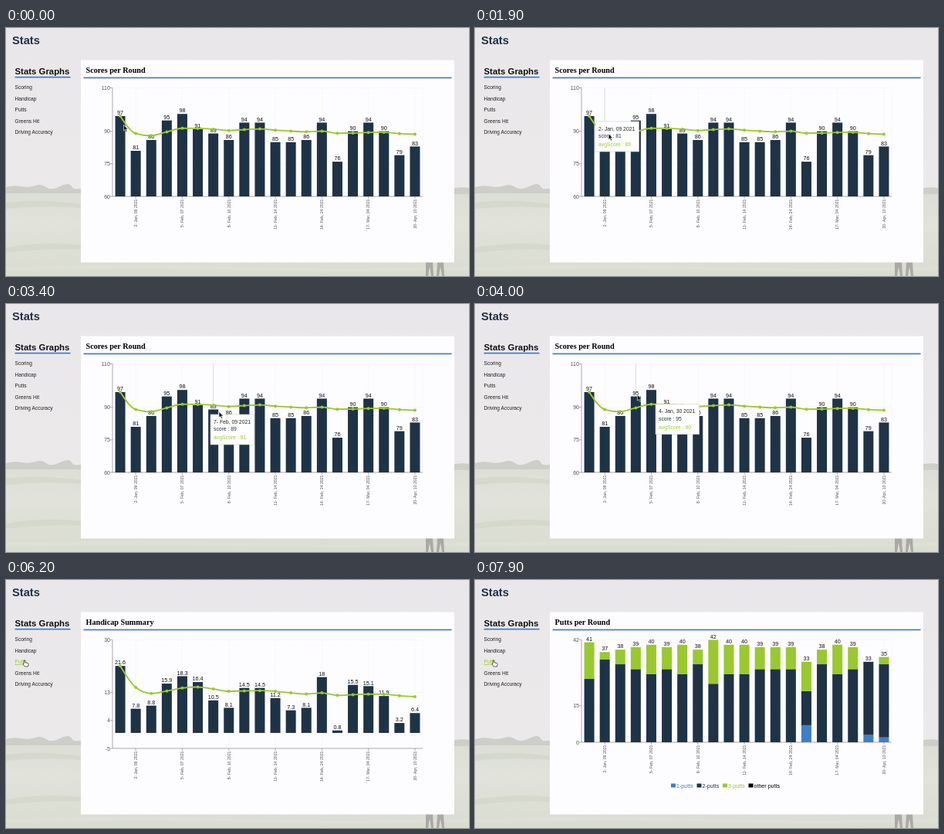
Write an HTML page that moves like this. It is 600 by 321 pixels and loops after 8000 ms.

```html
<!DOCTYPE html>
<html lang="en">
<head>
<meta charset="utf-8">
<title>Stats</title>
<style>
html, body { margin: 0; height: 100%; overflow: hidden; background: #e9e7e9; }
svg { display: block; width: 100vw; height: 100vh; font-family: "Liberation Sans", Arial, sans-serif; }
.green { fill: #9ac830; }
.navy { fill: #1f3347; }
.blue { fill: #3f7fc6; }
.axis { stroke: #777; stroke-width: .6; }
.grid { stroke: #ededf0; stroke-width: .6; stroke-dasharray: 2 1.5; }
.tick { font-size: 6.9px; fill: #555; text-anchor: end; }
.date { font-size: 5.2px; fill: #555; text-anchor: end; }
.value { font-size: 7.2px; fill: #111; text-anchor: middle; }
.menu { font-size: 6.6px; fill: #222; }
.menu.on { fill: #9ac830; text-decoration: underline; }
.legend { font-size: 7.1px; }
.tip { font-size: 6.8px; }
</style>
</head>
<body>
<svg id="stage" viewBox="0 0 600 321" preserveAspectRatio="none">
  <defs>
    <linearGradient id="sky" x2="0" y2="1"><stop stop-color="#e9e7e9"/><stop offset="1" stop-color="#ebe9ea"/></linearGradient>
    <linearGradient id="grass" x2="0" y2="1"><stop stop-color="#dcddd5"/><stop offset=".4" stop-color="#e1e2da"/><stop offset="1" stop-color="#d9dccf"/></linearGradient>
  </defs>
  <rect width="600" height="210" fill="url(#sky)"/>
  <rect y="209" width="600" height="112" fill="url(#grass)"/>
  <path d="M0 206q10-3 20-1t18-1 14 2 18-1 15 0 15 2v7H0zM578 208q10-3 22-1v8h-22z" fill="#cccec7"/>
  <path d="M0 226q40-6 100 2v5q-50-4-100 1zM0 284q50-8 100-3v6q-50-2-100 4z" fill="#d5d9cb"/>
  <path d="M0 309q150-5 300 0t300-1v5q-150 3-300 0t-300 1z" fill="#dee0d5"/>
  <path d="M544 303h9l1 18h-3l-2-12-2 12h-3zM559 303h8l1 18h-3l-2-12-2 12h-3z" fill="#aaa9a4"/>
  <rect x="97" y="41.5" width="484" height="262" fill="#fdfcfe"/>
  <text x="8" y="21.3" font-size="14.7" font-weight="bold" class="navy">Stats</text>
  <text x="11.5" y="60.3" font-size="11.4" font-weight="bold" fill="#111">Stats Graphs</text>
  <rect x="11.5" y="62.8" width="72" height="1.7" class="blue"/>
  <text id="title" x="103.5" y="58" font-size="10.2" font-weight="bold" font-family="'Liberation Serif', 'Times New Roman', serif"></text>
  <rect x="100.5" y="63.6" width="477" height="1.7" class="blue"/>
  <g id="menu"></g>
  <line id="guide" y1="77.5" y2="218" stroke="#ccc" stroke-width=".7"/>
  <g id="charts"></g>
  <g id="tip" class="tip">
    <rect width="56.5" height="39" fill="#fff" stroke="#ccc" stroke-width=".6"/>
    <text x="4" y="11.5" fill="#222"></text>
    <text x="4" y="20.8" class="navy"></text>
    <text x="4" y="31.8" class="green"></text>
  </g>
  <path id="arrow" d="M0 0v7.5l1.8-1.6 1.3 3 1.4-.6-1.3-2.9h2.4z" fill="#111" stroke="#fff" stroke-width=".6"/>
  <path id="hand" d="M-.8 0q.8-.8 1.6 0v2.8l3.6.9q.8.3.7 1.2l-.6 3.1h-4.2l-2.4-3.2q0-1 1.3-.4z" fill="#fff" stroke="#222" stroke-width=".7"/>
</svg>
<script>
const $ = id => document.getElementById(id);
const LOOP = 8000, LEFT = 138, RIGHT = 540, TOP = 77.5, STEP = 20.1, BAR = 13;
const scores = [97, 81, 86, 95, 98, 91, 89, 86, 94, 94, 85, 85, 86, 94, 76, 90, 94, 90, 79, 83];
const handicaps = [21.6, 7.8, 8.8, 15.9, 18.3, 16.4, 10.5, 8.1, 14.5, 14.5, 11.2, 7.3, 8.1, 18, .8, 15.5, 15.1, 11.9, 3.2, 6.4];
const putts = [41, 37, 38, 39, 40, 39, 40, 38, 42, 40, 40, 39, 39, 39, 33, 38, 40, 39, 33, 35];
const dates = ["Jan, 02", "Jan, 09", "Jan, 16", "Jan, 30", "Feb, 07", "Feb, 08", "Feb, 09", "Feb, 10", "Feb, 11", "Feb, 13",
  "Feb, 14", "Feb, 16", "Feb, 20", "Feb, 24", "Feb, 27", "Mar, 02", "Mar, 04", "Mar, 20", "Apr, 03", "Apr, 10"]
  .map((d, i) => `${i + 1}- ${d} 2021`);

function add(parent, tag, attrs, text = "") {
  const el = document.createElementNS("http://www.w3.org/2000/svg", tag);
  for (const k in attrs) el.setAttribute(k, attrs[k]);
  el.textContent = text;
  return parent.appendChild(el);
}
const show = (el, on) => el.style.display = on ? "" : "none";
const place = (el, [x, y]) => el.setAttribute("transform", `translate(${x} ${y})`);
const center = i => LEFT + STEP * (i + .5);
const averages = list => {
  let sum = 0;
  return list.map((v, i) => (sum += v) / (i + 1));
};

// Monotone cubic through evenly spaced points
function monotone(ys) {
  const slope = ys.slice(1).map((y, i) => (y - ys[i]) / STEP);
  const m = ys.map((_, i) => {
    const a = slope[i - 1], b = slope[i];
    return a === undefined || b === undefined ? null
      : (Math.sign(a) + Math.sign(b)) * Math.min(Math.abs(a), Math.abs(b), Math.abs(a + b) / 4);
  });
  const end = ys.length - 1, h = STEP / 3;
  m[0] = (3 * slope[0] - m[1]) / 2;
  m[end] = (3 * slope[end - 1] - m[end - 1]) / 2;
  return ys.reduce((d, y, i) => i
    ? `${d}C${center(i - 1) + h} ${ys[i - 1] + m[i - 1] * h} ${center(i) - h} ${y - m[i] * h} ${center(i)} ${y}`
    : `M${center(0)} ${y}`, "");
}

function axes(ticks, bottom) {
  const g = add($("charts"), "g", {});
  const low = ticks[0], high = ticks[ticks.length - 1];
  const y = v => bottom - (v - low) / (high - low) * (bottom - TOP);
  const line = (cls, x1, y1, x2, y2) => add(g, "line", { class: cls, x1, y1, x2, y2 });
  for (const v of ticks) {
    line("grid", LEFT, y(v), RIGHT, y(v));
    line("axis", LEFT - 3, y(v), LEFT, y(v));
    add(g, "text", { class: "tick", x: LEFT - 3.2, y: y(v) + 2.5 }, v);
  }
  for (let i = 1; i < 20; i += 3) {
    const x = center(i);
    line("grid", x, TOP, x, bottom);
    line("axis", x, bottom, x, bottom + 3);
    add(g, "text", { class: "date", transform: `translate(${x + 1.8} ${bottom + 3.5}) rotate(-90)` }, dates[i]);
  }
  line("grid", RIGHT, TOP, RIGHT, bottom);
  line("axis", LEFT, TOP, LEFT, bottom);
  line("axis", LEFT, bottom, RIGHT, bottom);
  return { g, y };
}
const bar = (g, cls, i, y, height) =>
  add(g, "rect", { class: cls, x: center(i) - BAR / 2, y, width: BAR, height });
const label = (g, i, v, y) => add(g, "text", { class: "value", x: center(i), y: y - 1.8 }, v);

function lineChart(list, ticks) {
  const { g, y } = axes(ticks, 218);
  const base = y(Math.max(0, ticks[0]));
  list.forEach((v, i) => bar(g, "navy", i, y(v), base - y(v)));
  list.forEach((v, i) => label(g, i, v, y(v)));
  const ys = averages(list).map(y);
  add(g, "path", { d: monotone(ys), fill: "none", stroke: "#9ac830", "stroke-width": 1.8 });
  ys.forEach((cy, i) => add(g, "circle", { class: "green", cx: center(i), cy, r: 2 }));
  return g;
}

function puttsChart() {
  const { g, y } = axes([0, 15, 42], 210);
  const ones = { 14: 7, 18: 3, 19: 2 }, twosTop = { 14: 21, 18: 33, 19: 32 };
  const parts = [];
  putts.forEach((n, i) => {
    const levels = [0, ones[i] || 0, twosTop[i] || 108 - 2 * n, n];
    ["blue", "navy", "green"].forEach((cls, k) => {
      const bottom = y(levels[k]);
      parts.push({ el: bar(g, cls, i, bottom, 0), bottom, height: bottom - y(levels[k + 1]) });
    });
  });
  const labels = add(g, "g", {});
  putts.forEach((n, i) => label(labels, i, n, y(n)));
  [["1-putts", 254, "blue"], ["2-putts", 287.5, "navy"], ["3-putts", 321, "green"], ["other putts", 354.5, ""]]
    .forEach(([name, x, cls]) => {
      add(g, "rect", { class: cls, x, y: 263.5, width: 6, height: 5 });
      add(g, "text", { class: "legend " + cls, x: x + 7, y: 268.5 }, name);
    });
  const grow = p => {
    for (const { el, bottom, height } of parts) {
      el.setAttribute("y", bottom - height * p);
      el.setAttribute("height", height * p);
    }
    show(labels, p >= 1);
  };
  return { g, grow };
}

// The CSS "ease" curve
function ease(x) {
  if (x <= 0 || x >= 1) return x <= 0 ? 0 : 1;
  const curve = (s, a, b) => 3 * s * (1 - s) ** 2 * a + 3 * s * s * (1 - s) * b + s ** 3;
  let lo = 0, hi = 1;
  for (let n = 0; n < 20; n++) {
    const mid = (lo + hi) / 2;
    if (curve(mid, .25, .25) < x) lo = mid; else hi = mid;
  }
  return curve(lo, .1, 1);
}

// Position along keys of [time, x, y]
function along(keys, t) {
  const n = keys.findIndex(k => k[0] > t);
  if (n <= 0) return keys[n ? keys.length - 1 : 0].slice(1);
  const [t0, ...a] = keys[n - 1], [t1, ...b] = keys[n];
  return a.map((v, i) => v + (b[i] - v) * (t - t0) / (t1 - t0));
}
const pointer = [[0, 152.5, 125.5], [1000, 152.5, 125.5], [1600, 153, 118], [1800, 164, 130], [1900, 173, 137],
  [2800, 173, 138], [3100, 212, 139], [3400, 276, 139.5], [3600, 361, 139], [3700, 361, 138],
  [4200, 110, 104], [4500, 32, 90], [5400, 32, 90], [5900, 25, 103], [6200, 24, 104]];
const tipPath = [[1600, 153, 116], [1800, 153, 117], [1900, 156, 121], [2100, 172, 142], [2800, 173, 143],
  [3100, 203, 143.5], [3400, 265, 143], [3600, 366, 144], [3700, 366, 144], [4100, 190, 125]];

const menu = ["Scoring", "Handicap", "Putts", "Greens Hit", "Driving Accuracy"]
  .map((name, i) => add($("menu"), "text", { x: 11.5, y: 79 + 14.55 * i }, name));
const scoring = lineChart(scores, [60, 75, 90, 110]);
const handicap = lineChart(handicaps, [-5, 4, 13, 30]);
const puttsView = puttsChart();
const scoreAverages = averages(scores);

function draw(t) {
  const at = along(pointer, t), [px] = at;
  const hover = t < 4400 ? -1 : t < 5800 ? 1 : 2;
  menu.forEach((el, i) => el.setAttribute("class", i === hover ? "menu on" : "menu"));
  $("title").textContent = t < 4700 ? "Scores per Round" : t < 6900 ? "Handicap Summary" : "Putts per Round";
  show(scoring, t < 4900);
  show(handicap, t >= 4900 && t < 6900);
  show(puttsView.g, t >= 6900);
  puttsView.grow(ease((t - 6920) / 400));

  const tipOn = t >= 1600 && t < 4400 && px > LEFT;
  show($("tip"), tipOn);
  show($("guide"), tipOn);
  if (tipOn) {
    const i = Math.floor((px - LEFT) / STEP);
    const [name, score, avg] = $("tip").querySelectorAll("text");
    name.textContent = dates[i];
    score.textContent = "score : " + scores[i];
    avg.textContent = "avgScore : " + Math.round(scoreAverages[i]);
    place($("tip"), along(tipPath, t));
    $("guide").setAttribute("x1", center(i));
    $("guide").setAttribute("x2", center(i));
  }
  show($("arrow"), hover < 0);
  show($("hand"), hover >= 0);
  place($("arrow"), at);
  place($("hand"), at);
}

const start = performance.now();
function tick() {
  const t = (performance.now() - start) % LOOP;
  draw(Math.floor(t / 100) * 100);
  requestAnimationFrame(tick);
}
tick();
</script>
</body>
</html>
```
